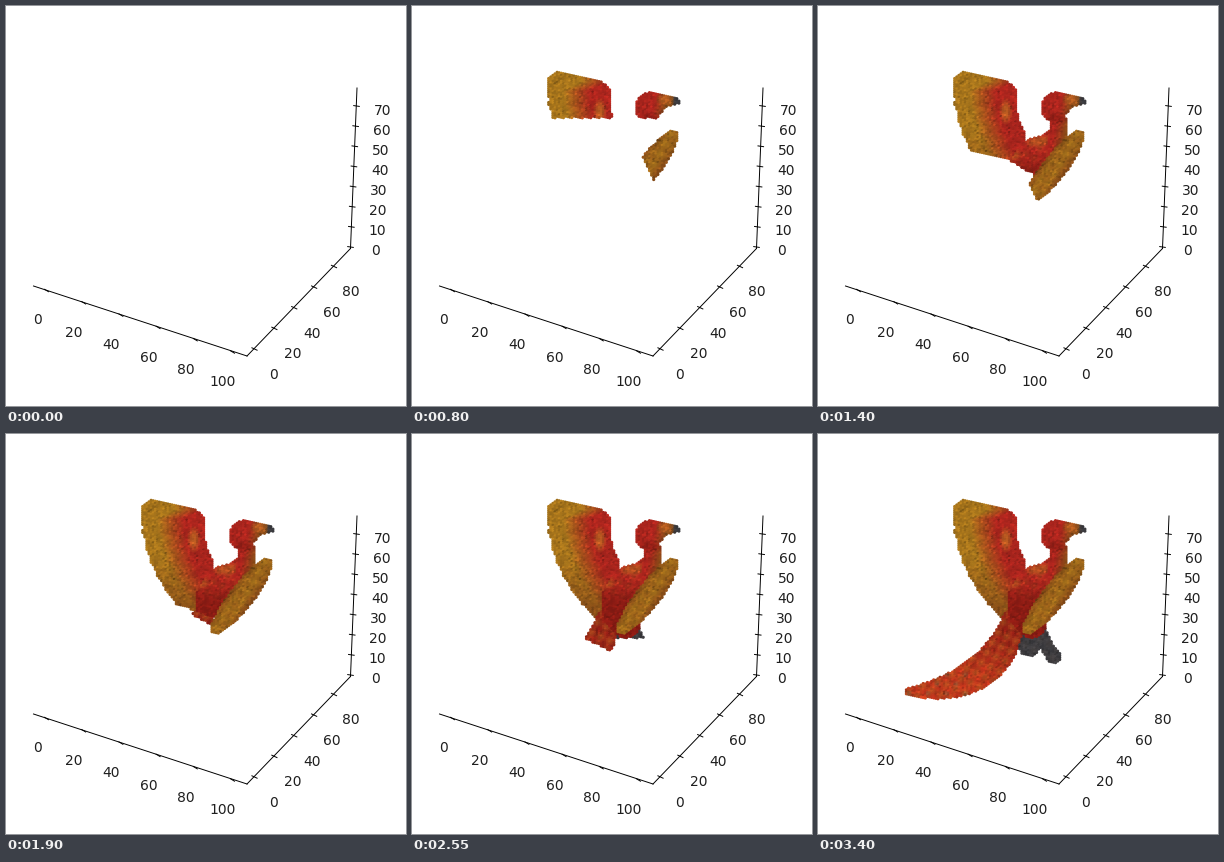
Animation of 400x400 px, one loop 3.68 s. Source, as a matplotlib script:

```python
import numpy as np
import matplotlib.pyplot as plt
from matplotlib.animation import FuncAnimation

SIZE, DPI = 400, 100
TICK_MS, STEP_MS, LOOP_MS = 10, 50, 3680
LAST_STEP = 68

GOLD, BROWN, ORANGE = (172, 120, 28), (140, 78, 24), (190, 98, 34)
RED, DARK_RED, FLAME = (176, 38, 30), (142, 28, 20), (194, 52, 28)
GREY, OLIVE = (58, 58, 62), (108, 96, 62)

rng = np.random.default_rng(4)

fig = plt.figure(figsize=(SIZE / DPI, SIZE / DPI), dpi=DPI, facecolor="white")
ax = fig.add_axes([0, 0, 1, 1])
ax.set(xlim=(0, SIZE), ylim=(SIZE, 0))
ax.axis("off")


def draw_axis(start, end, first, last, labels, offset, drift, tick):
    """One axis line with even ticks; labels sit at an offset from them."""
    ax.plot(*zip(start, end), color="black", lw=0.7)
    for label, f in zip(labels, np.linspace(0, 1, len(labels))):
        x, y = np.add(first, f * np.subtract(last, first))
        ax.plot([x - tick[0], x + tick[0]], [y - tick[1], y + tick[1]],
                color="black", lw=0.7)
        tx, ty = np.add((x, y), offset) + f * np.array(drift)
        ax.text(tx, ty, str(label), fontsize=10, color="0.12", ha="center",
                va="center_baseline")


NEAR, RIGHT = (241, 350), (344.5, 242.5)
draw_axis((27.5, 280), NEAR, (40.5, 284.5), (226.5, 346), range(0, 101, 20),
          (-9.5, 28.5), (0, 0.5), (2, 1.2))
draw_axis(NEAR, RIGHT, (248.5, 343), (328, 260.5), range(0, 81, 20),
          (18.5, 24.5), (-1.5, -0.5), (2.6, 1.2))
draw_axis(RIGHT, (351, 82), (344.5, 241), (350.5, 100), range(0, 71, 10),
          (25.5, 2.2), (0.5, 1.3), (2.8, 0.4))


def bezier(points, t):
    a, b, c = np.array(points, float)[:, None]
    t = t[:, None]
    return (1 - t) ** 2 * a + 2 * t * (1 - t) * b + t ** 2 * c


def stroke(*points):
    """Tapered brush along a curve; each point is x, y, half width."""
    spine = bezier(points, np.linspace(0, 1, 50))

    def inside(x, y):
        gaps = np.hypot(x[:, None] - spine[:, 0], y[:, None] - spine[:, 1])
        return (gaps < spine[:, 2]).any(axis=1)
    return inside


def union(*shapes):
    return lambda x, y: np.any([s(x, y) for s in shapes], axis=0)


def outside_hollow(x, y):
    """The gap between the raised wing and the neck."""
    return np.hypot((x - 218) / 19, (y - 99) / 32) > 1


def wing_edge(y):
    """Outer edge of the raised wing, scalloped by feathers."""
    f = np.clip((y - 70) / 115, 0, 1)
    return 135 + 49 * f ** 2.3 + 1.8 * np.abs(np.sin(y / 4.5)) - 1


def raised_wing(x, y):
    top = 66 + 0.18 * np.maximum(0, x - 144) + 0.8 * np.maximum(0, 144 - x)
    top += 8 * np.clip((x - 144) / 54, 0, 1) ** 9
    right = np.where(y < 108, 198, 208)
    return ((y > top) & (y < 186) & (x > wing_edge(y)) & (x < right)
            & outside_hollow(x, y))


torso = stroke((235, 138, 14), (198, 163, 27), (214, 190, 14))


def body(x, y):
    return torso(x, y) & outside_hollow(x, y)


head = union(stroke((236, 103, 12.5), (236, 98, 13), (242, 98, 11.5)),
             stroke((246, 96, 8), (257, 94, 6), (266, 95.5, 2)),
             stroke((240, 112, 8), (241, 124, 7), (240, 142, 11)))
tail = stroke((196, 185, 11), (178, 255, 24), (91, 258, 4))
legs = union(stroke((216, 200, 10), (212, 214, 11), (210, 213, 9)),
             stroke((223, 198, 6), (229, 216, 6), (236, 223, 7)))
folded_wing = stroke((261, 130, 5.5), (240, 158, 18), (211, 194, 6.5))


def blend(a, b, t):
    t = np.clip(t, 0, 1)[:, None]
    return np.asarray(a) * (1 - t) + np.asarray(b) * t


def spot(x, y, cx, cy, rx, ry):
    """Soft elliptical blob, 1 in the middle and 0 outside."""
    return np.clip(1.6 - 1.6 * np.hypot((x - cx) / rx, (y - cy) / ry), 0, 1)


def mottle(x, y):
    return 0.5 + 0.25 * (np.sin(0.55 * x + 0.3 * y) + np.sin(0.5 * y - 0.23 * x))


def raised_wing_color(x, y):
    inward = (x - wing_edge(y) - 16) / 26 - np.clip((86 - y) / 14, 0, 0.7)
    c = blend(GOLD, BROWN, (y - 130) / 60 + 0.2 * mottle(x, y))
    c = blend(c, RED, inward)
    return blend(c, ORANGE, 0.9 * spot(x, y, 188, 106, 7, 14))


def body_color(x, y):
    c = blend(RED, ORANGE, 0.3 * mottle(x, y) ** 2)
    c = blend(c, DARK_RED, (y - 145) / 25)
    c = blend(c, ORANGE, 0.6 * spot(x, y, 196, 150, 9, 6))
    return blend(c, ORANGE, 0.7 * spot(x, y, 221, 136, 15, 7))


def head_color(x, y):
    c = blend(RED, BROWN, (x + 0.2 * y - 262) / 12)
    c = blend(c, DARK_RED, 0.8 * spot(x, y, 238, 113, 14, 7))
    c = blend(c, ORANGE, spot(x, y, 253, 94, 9, 7))
    return blend(c, GREY, (x - 260) / 3)


def tail_color(x, y):
    c = blend(DARK_RED, FLAME, (y + 0.4 * (190 - x) - 195) / 60)
    c = blend(c, ORANGE, 0.6 * mottle(x, y) ** 1.5)
    eyes = np.cos((x - 110) / 3) * np.cos((y - 260) / 3)
    return blend(c, OLIVE, (eyes - 0.5) * (x < 152))


def leg_color(x, y):
    return blend(GREY, (92, 82, 78), 0.4 * mottle(x, y))


def folded_wing_color(x, y):
    across = 0.8 * (x - 262) + 0.6 * (y - 126)
    c = blend(GOLD, BROWN, 0.15 + 0.45 * mottle(x, y))
    return blend(c, BROWN, (np.abs(across - 1) - 5) / 6)


# Each rule gives the step at which the falling height cut reaches a point.
def main_step(x, y):
    tilt = 0.35 * np.clip((y - 110) / 55, 0, 1) ** 2
    return np.interp(y - tilt * (x - 150), [66, 112, 145, 163, 186],
                     [0, 16, 28, 38, 51])


def tail_step(x, y):
    return np.interp(y + 0.5 * (190 - x), [183, 213, 247, 309], [38, 51, 59, 68])


def leg_step(x, y):
    return 51 + 0.64 * (y - 204)


def folded_wing_step(x, y):
    return 0.41 * (0.9 * (262 - x) + 0.43 * (y - 126))


# Painted from far to near.
PARTS = [
    (raised_wing, raised_wing_color, main_step),
    (tail, tail_color, tail_step),
    (legs, leg_color, leg_step),
    (body, body_color, main_step),
    (head, head_color, main_step),
    (folded_wing, folded_wing_color, folded_wing_step),
]

gx, gy = np.meshgrid(np.arange(80, 272, 2.1), np.arange(20, 276, 2.0))
lattice = np.column_stack([gx.ravel(), (gy + 0.22 * (gx - 80)).ravel()])


def fill(shape, color, step):
    """Voxel dots on the slanted lattice inside a shape."""
    dots = lattice[shape(*lattice.T)]
    x, y = dots.T
    shade = rng.normal(0.97, 0.08, len(dots))[:, None]
    rgb = np.clip(color(x, y) * shade / 255, 0, 1)
    return dots, rgb, np.clip(np.ceil(step(x, y)), 1, LAST_STEP)


dots, colors, steps = (np.concatenate(a) for a in zip(*(fill(*p) for p in PARTS)))
cloud = ax.scatter([], [], s=5.2, linewidths=0)


def update(frame):
    shown = steps <= min(frame * TICK_MS // STEP_MS, LAST_STEP)
    cloud.set_offsets(dots[shown])
    cloud.set_facecolors(colors[shown])
    return [cloud]


anim = FuncAnimation(fig, update, frames=LOOP_MS // TICK_MS, interval=TICK_MS,
                     init_func=lambda: update(0), repeat=True, repeat_delay=0,
                     cache_frame_data=False)
plt.show()
```
